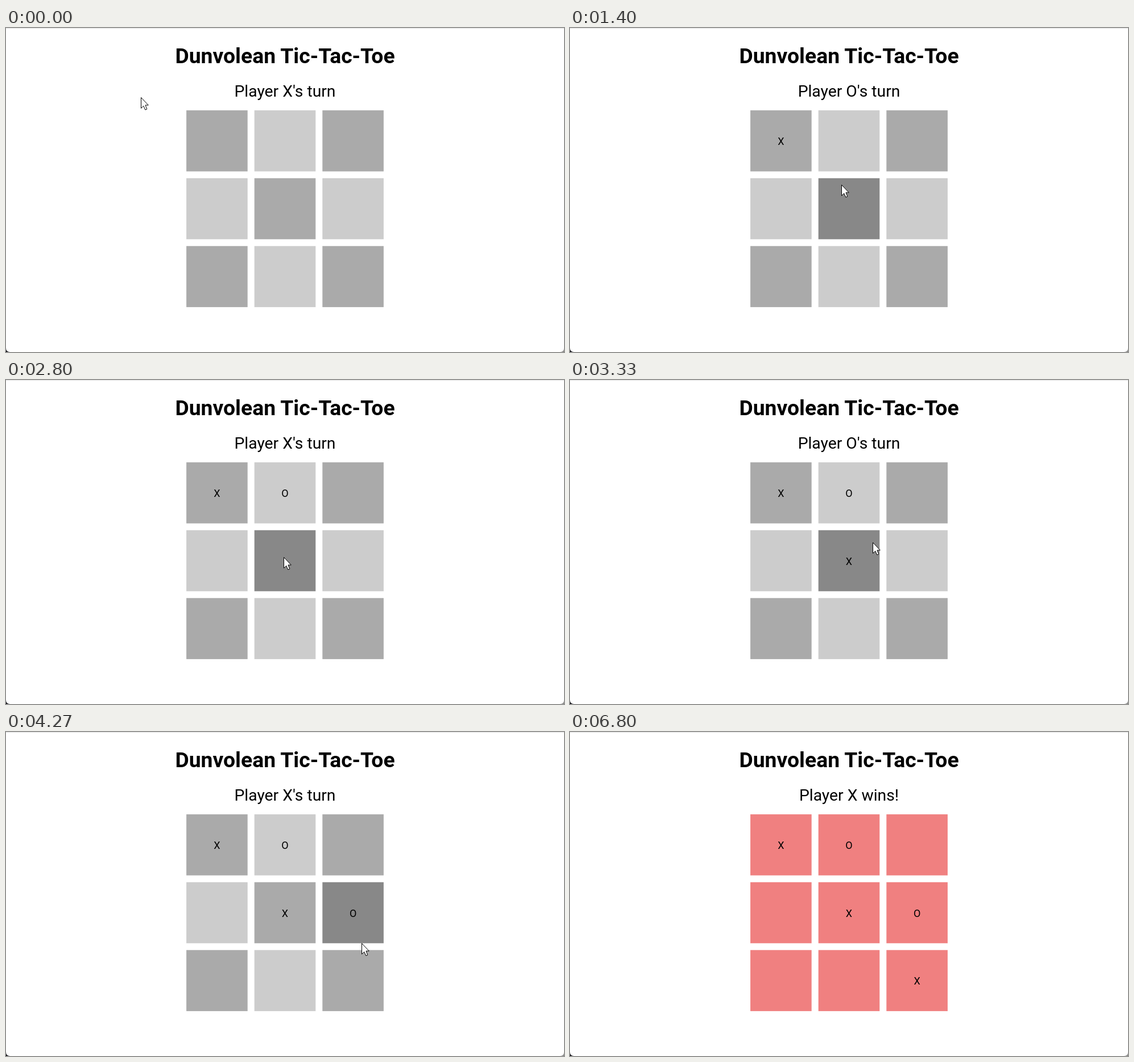
An HTML page for the animation above (6940 ms loop, 981 px wide and 571 px high).

```html
<!DOCTYPE html>
<html lang="en">
<head>
<meta charset="utf-8">
<title>Tic-Tac-Toe</title>
<style>
  html, body { margin: 0; width: 100%; height: 100%; overflow: hidden; background: #fff; }
  svg { display: block; width: 981px; height: 571px; }
  text { font-family: Roboto, "Open Sans", sans-serif; text-anchor: middle; }
</style>
</head>
<body>
<svg viewBox="0 0 981 571">
  <path d="M0 .5H981" stroke="#e1e1e1"/>
  <path d="M0 564Q0 571 7 571H0Z" fill="#16161c"/>
  <path d="M981 564Q981 571 974 571H981Z" fill="#8c8c8c"/>
  <text x="490.5" y="62" font-size="37.3" font-weight="700">Dunvolean Tic-Tac-Toe</text>
  <text id="status" x="490.5" y="121" font-size="28.3"></text>
  <g id="board"></g>
  <path id="cursor" d="M.5 .5V19.5L4.8 15.4L7.8 22.2L10.8 21L8 14H13.3Z" fill="#fff" stroke="#000"/>
</svg>
<script>
const LOOP = 6940;
const TICKS_PER_MS = 0.015;
const HIDE_TICK = 94;
const LEFT = 317.1, TOP = 145.1, SIZE = 107.6, STEP = 119.6;

// Moves as [tick, cell], X first
const moves = [[16, 0], [34, 1], [47, 4], [60, 5], [73, 8]];

// Pointer trips as [start tick, end tick, x, y]; it rests between them
const start = [237, 122];
const trips = [
  [0, 5, 396, 208], [17, 23, 505, 300], [26, 28, 519, 231],
  [28, 30, 514, 212], [36, 42, 488, 312], [48, 53, 612, 238],
  [53, 54, 623, 272], [60, 67, 626, 437], [91, 93, 415, 530]
];

const byId = id => document.getElementById(id);
const status = byId("status"), board = byId("board"), cursor = byId("cursor");

function add(tag, attrs) {
  const el = document.createElementNS("http://www.w3.org/2000/svg", tag);
  for (const key in attrs) el.setAttribute(key, attrs[key]);
  return board.appendChild(el);
}

const cells = Array.from({ length: 9 }, (_, i) => {
  const x = LEFT + STEP * (i % 3);
  const y = TOP + STEP * Math.floor(i / 3);
  return {
    x, y,
    color: i % 2 ? "#ccc" : "#aaa",
    rect: add("rect", { x, y, width: SIZE, height: SIZE }),
    mark: add("text", { x: x + SIZE / 2, y: y + 61, "font-size": 18 })
  };
});

const inside = (v, from) => v >= from && v < from + SIZE;

function pointerAt(tick) {
  let [x, y] = start;
  for (const [from, to, endX, endY] of trips) {
    const k = Math.min(1, Math.max(0, (tick - from) / (to - from)));
    const ease = k * k * (3 - 2 * k);
    x += (endX - x) * ease;
    y += (endY - y) * ease;
  }
  return [Math.round(x), Math.round(y)];
}

function draw() {
  const time = performance.now() % LOOP;
  // The small offset absorbs times rounded to 10 ms
  const tick = Math.floor((time + 4) * TICKS_PER_MS);
  const [x, y] = pointerAt(tick);
  const played = moves.filter(move => move[0] <= tick);
  const won = played.length === moves.length;

  cells.forEach((cell, i) => {
    const turn = played.findIndex(move => move[1] === i);
    const hover = inside(x, cell.x) && inside(y, cell.y);
    cell.rect.setAttribute("fill", won ? "#f08080" : hover ? "#888" : cell.color);
    cell.mark.textContent = turn < 0 ? "" : "XO"[turn % 2];
  });

  status.textContent = won ? "Player X wins!" : `Player ${"XO"[played.length % 2]}'s turn`;
  cursor.setAttribute("transform", `translate(${x} ${y})`);
  cursor.setAttribute("visibility", tick < HIDE_TICK ? "visible" : "hidden");
  requestAnimationFrame(draw);
}
draw();
</script>
</body>
</html>
```
